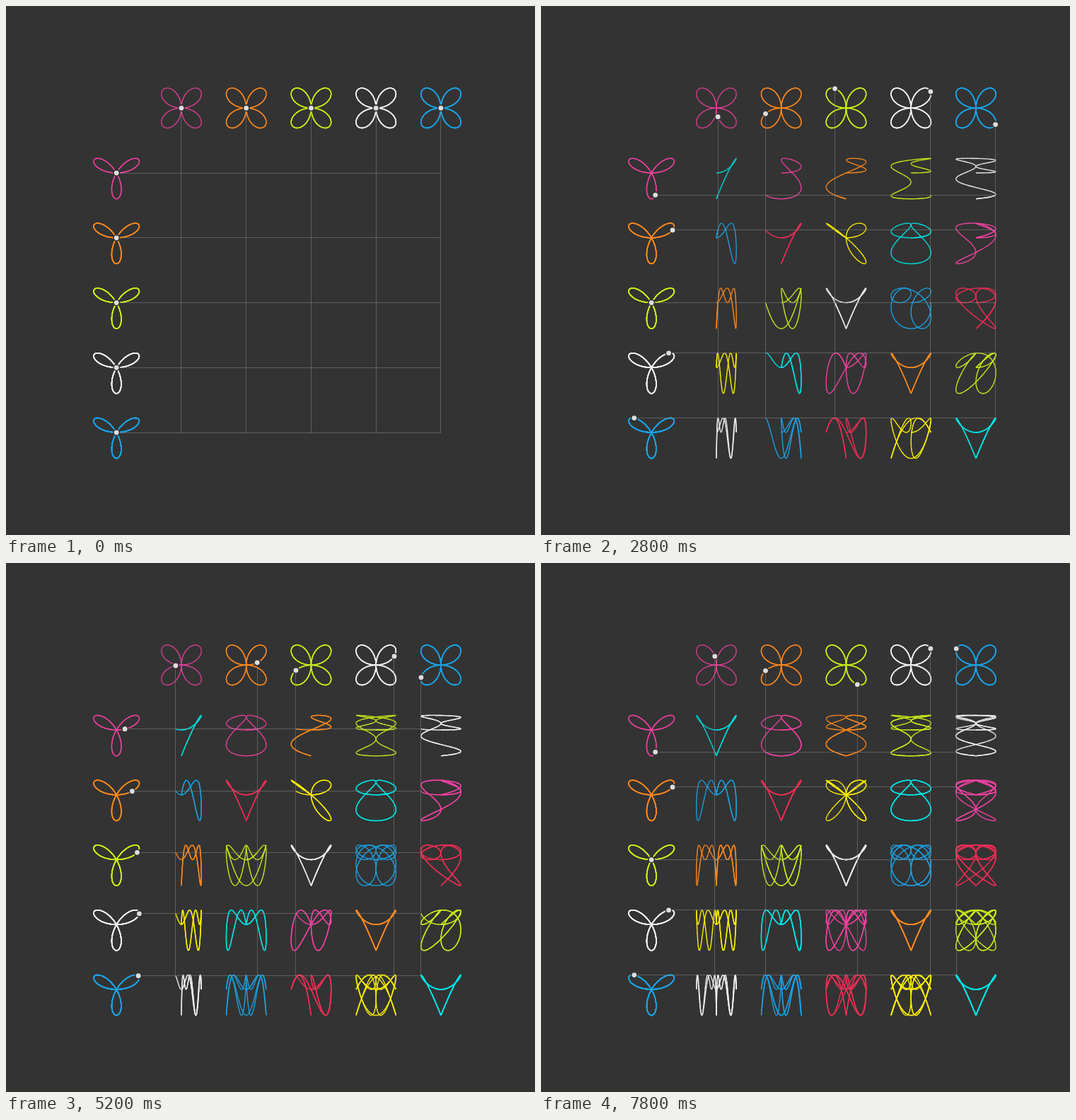
These frames come from a looping animation (748x748 px, 8 s). An HTML page with a canvas:

```html
<!DOCTYPE html>
<html lang="en">
<head>
<meta charset="utf-8">
<title>Rose curve table</title>
<style>
  html, body { margin: 0; width: 100%; height: 100%; overflow: hidden; background: #333; }
  canvas { display: block; }
</style>
</head>
<body>
<canvas id="stage" width="748" height="748"></canvas>
<script>
const ctx = document.getElementById('stage').getContext('2d');
const SIZE = 748, COUNT = 5, CELL = 91.75, LEFT = 156.2, TOP = 144.3, RADIUS = 36.7;
const FRAME_MS = 200, FRAMES = 40;
const STEP = 0.8 * Math.PI / 180, STEPS_PER_FRAME = 9, FULL_TURN = 450;
const BACKGROUND = '#333';
const [PINK, ORANGE, LIME, WHITE, BLUE, RED, YELLOW, CYAN] =
  ['#f542a4', '#ff8a1e', '#c8ee1a', '#eeeeee', '#1ba1e2', '#f32d56', '#fff200', '#00e2e2'];
const HEADER_COLORS = [PINK, ORANGE, LIME, WHITE, BLUE];
const CELL_COLORS = [CYAN, PINK, ORANGE, LIME, WHITE, BLUE, RED, YELLOW];
const rates = Array.from({ length: COUNT }, (_, i) => i + 1);

function rose(petals, angle, x, y) {
  const r = RADIUS * Math.sin(petals * angle);
  return { x: x + r * Math.cos(angle), y: y - r * Math.sin(angle) };
}

const columnPoint = (rate, step) => rose(2, rate * step * STEP, LEFT + rate * CELL, TOP);
const rowPoint = (rate, step) => rose(3, rate * step * STEP, LEFT, TOP + rate * CELL);

// Segments are stroked one by one so that retraced lines grow stronger.
function trace(pointAt, steps, color) {
  ctx.strokeStyle = color;
  ctx.lineWidth = 1.4;
  let from = pointAt(0);
  for (let s = 1; s <= steps; s++) {
    const to = pointAt(s);
    ctx.beginPath();
    ctx.moveTo(from.x, from.y);
    ctx.lineTo(to.x, to.y);
    ctx.stroke();
    from = to;
  }
}

function dottedLine(x1, y1, x2, y2) {
  const snap = v => Math.floor(v) + 0.5;
  ctx.beginPath();
  ctx.moveTo(snap(x1), snap(y1));
  ctx.lineTo(snap(x2), snap(y2));
  ctx.stroke();
}

function disc({ x, y }, radius, color) {
  ctx.fillStyle = color;
  ctx.beginPath();
  ctx.arc(x, y, radius, 0, 2 * Math.PI);
  ctx.fill();
}

function draw(frame) {
  const step = Math.max(0, frame * STEPS_PER_FRAME - 1);
  const columnDots = rates.map(rate => columnPoint(rate, step));
  const rowDots = rates.map(rate => rowPoint(rate, step));

  ctx.fillStyle = BACKGROUND;
  ctx.fillRect(0, 0, SIZE, SIZE);

  rates.forEach((rate, i) => {
    trace(s => columnPoint(rate, s), FULL_TURN, HEADER_COLORS[i]);
    trace(s => rowPoint(rate, s), FULL_TURN, HEADER_COLORS[i]);
  });

  rates.forEach((row, j) => rates.forEach((column, i) => {
    const color = CELL_COLORS[(j * COUNT + i) % CELL_COLORS.length];
    trace(s => ({ x: columnPoint(column, s).x, y: rowPoint(row, s).y }), step, color);
  }));

  ctx.strokeStyle = '#8a8a8a';
  ctx.lineWidth = 1;
  ctx.setLineDash([1, 1]);
  const right = columnDots[COUNT - 1].x, bottom = rowDots[COUNT - 1].y;
  columnDots.forEach(({ x, y }) => dottedLine(x, y, x, bottom));
  rowDots.forEach(({ x, y }) => dottedLine(x, y, right, y));
  ctx.setLineDash([]);

  for (const dot of [...columnDots, ...rowDots]) {
    disc(dot, 5, BACKGROUND);
    disc(dot, 3.4, '#dedede');
  }
}

const start = performance.now();
let shown = -1;
function tick() {
  const frame = Math.floor((performance.now() - start) / FRAME_MS) % FRAMES;
  if (frame !== shown) draw(shown = frame);
  requestAnimationFrame(tick);
}
tick();
</script>
</body>
</html>
```
